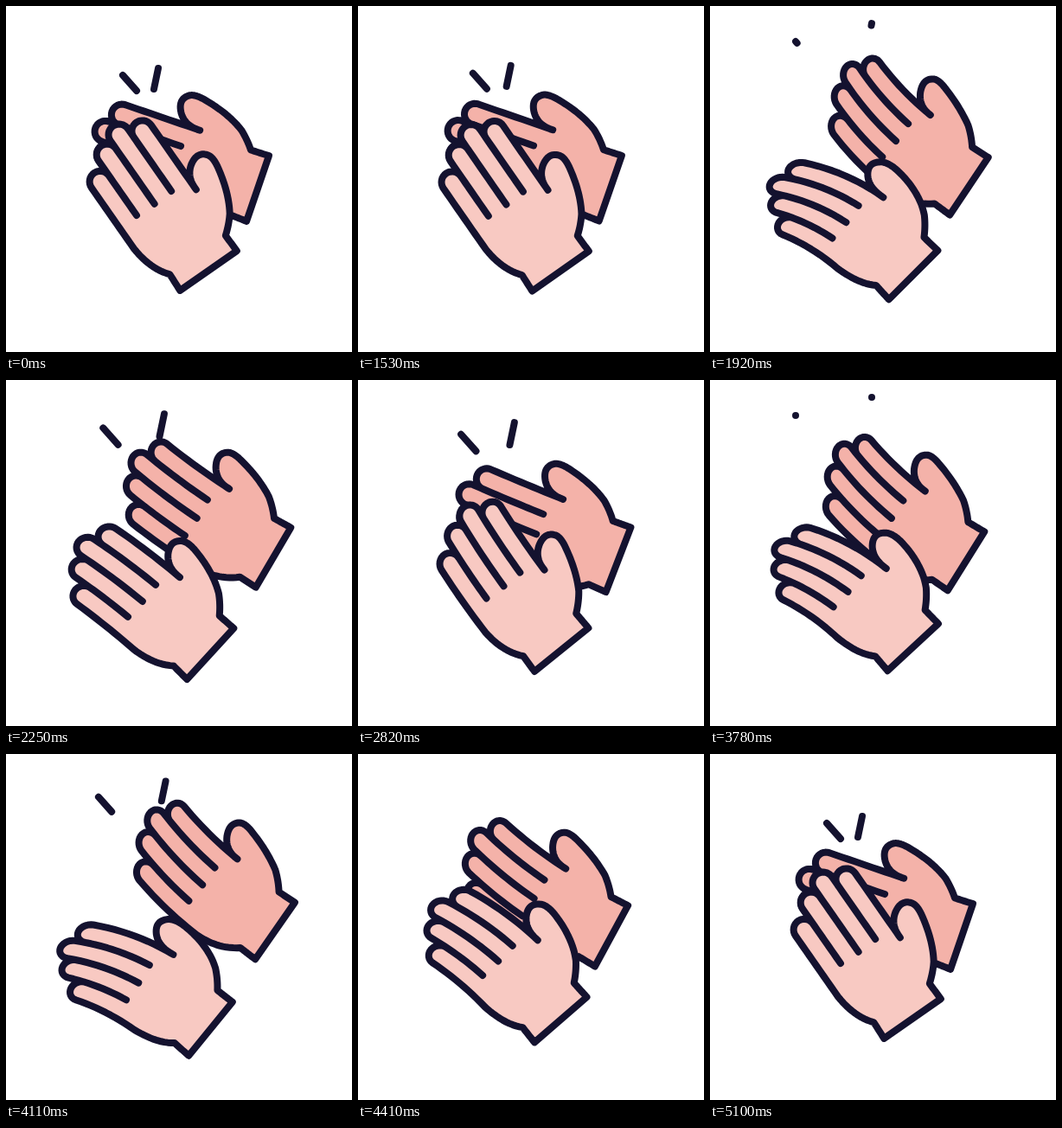
An HTML page with a canvas for the animation above (5160 ms loop, 400 px wide and 400 px high).

```html
<!DOCTYPE html>
<html lang="en">
<head>
<meta charset="utf-8">
<title>Clapping hands</title>
<style>
html, body { margin: 0; height: 100%; overflow: hidden; background: #fff; }
canvas { display: block; }
</style>
</head>
<body>
<canvas id="stage" width="400" height="400"></canvas>
<script>
const ctx = document.getElementById('stage').getContext('2d');
const LOOP = 5160, STEP = 30, FIRST = 50, LAST = 170, PERIOD = 20.2, SLOW = 97;
const INK = '#14122f';
const lerp = (a, b, k) => a + (b - a) * k;

// One clap: phase, shift, front turn, back turn, front bend, back bend, spark travel, spark length
const CLAP = [
  [0, 0, 0, 0, 0, 0, 0, 1],
  [1, .04, .3, .2, -1, 0, .06, 1],
  [3.6, .5, 4, 2.2, -10, 3, .44, 1.08],
  [4.8, .9, 12.6, 11.5, 11, 12, .63, 1.08],
  [7.5, 1, 17, 18, 56, 30, .88, .8],
  [11, .75, 14, 17, 50, 32, .98, .35],
  [15.4, .25, 8, 13.2, 38, 26, 1, 0],
  [16.2, .1, 6, 9.6, 27, 20, 1, 0],
  [18, .04, 2, 3, 8, 6, 1, 0],
  [PERIOD, 0, 0, 0, 0, 0, 1, 0]
];

// Smooth curve through the keys of one column
function sample(col, phase) {
  const end = CLAP.length - 1;
  let i = 0;
  while (i < end - 1 && CLAP[i + 1][0] <= phase) i++;
  const slope = j => j === 0 || j === end ? 0 :
    (CLAP[j + 1][col] - CLAP[j - 1][col]) / (CLAP[j + 1][0] - CLAP[j - 1][0]);
  const a = CLAP[i], b = CLAP[i + 1], span = b[0] - a[0];
  const k = (phase - a[0]) / span, k2 = k * k, k3 = k2 * k;
  return a[col] * (2 * k3 - 3 * k2 + 1) + b[col] * (3 * k2 - 2 * k3) +
    span * (slope(i) * (k3 - 2 * k2 + k) + slope(i + 1) * (k3 - k2));
}

// Hand outline: u runs from wrist to fingertips, v across towards the thumb
function buildHand() {
  const pts = [[0, -40]];
  const curve = (cu, cv, u, v) => {
    const [u0, v0] = pts[pts.length - 1];
    for (let i = 1; i <= 12; i++) {
      const k = i / 12;
      pts.push([lerp(lerp(u0, cu, k), lerp(cu, u, k), k), lerp(lerp(v0, cv, k), lerp(cv, v, k), k)]);
    }
  };
  const line = (u, v) => {
    const [u0, v0] = pts[pts.length - 1];
    curve((u0 + u) / 2, (v0 + v) / 2, u, v);
  };
  line(22, -39);
  curve(40, -54, 70, -56);
  const r = 12.25, roots = [100, 99, 100, 85];
  [156, 177, 188, 176].forEach((tip, i) => {
    const mid = -43.75 + i * 2 * r;
    line(tip, mid - r);
    for (let k = 1; k <= 16; k++) {
      const a = Math.PI * k / 16;
      pts.push([tip + r * Math.sin(a), mid - r * Math.cos(a)]);
    }
    line(roots[i], mid + r);
  });
  curve(103, 41, 112, 54);
  curve(121, 68, 110, 76);
  curve(104, 80, 90, 77);
  curve(60, 71, 40, 58);
  curve(30, 50, 22, 39.5);
  line(0, 40);
  return pts;
}
const HAND = buildHand();

function drawHand(x, y, degrees, bend, fill) {
  const angle = degrees * Math.PI / 180, c = Math.cos(angle), s = Math.sin(angle);
  ctx.beginPath();
  for (let [u, v] of HAND) {
    const f = bend * (u - 50);
    if (u > 50 && Math.abs(bend) > 1e-6) {
      u = 50 + Math.sin(f) / bend - v * Math.sin(f) / 2;
      v = (1 - Math.cos(f)) / bend + v * Math.cos(f);
    }
    ctx.lineTo(x - s * u + c * v, y - c * u - s * v);
  }
  ctx.closePath();
  ctx.fillStyle = fill;
  ctx.fill();
  ctx.stroke();
}

function drawSpark(x, y, tailX, tailY, flyX, flyY, phase) {
  const grow = (phase - 18) / (PERIOD - 18);
  if (phase > 15.9 && grow <= 0) return;
  const growing = grow > 0;
  const head = growing ? 1 - grow : 0;
  const tail = growing ? 1 : Math.max(0, sample(7, phase));
  const fly = growing ? 0 : sample(6, phase);
  const px = x + flyX * fly, py = y + flyY * fly;
  ctx.beginPath();
  ctx.moveTo(px + tailX * head, py + tailY * head);
  ctx.lineTo(px + tailX * tail + .01, py + tailY * tail);
  ctx.stroke();
}

function phaseAt(time) {
  const n = Math.floor(time % LOOP / STEP);
  if (n <= FIRST || n >= LAST) return 0;
  const run = n - FIRST;
  if (run <= SLOW) return run % PERIOD;
  // the last clap settles slowly
  return lerp(SLOW % PERIOD, PERIOD, (run - SLOW) / (LAST - FIRST - SLOW));
}

const start = performance.now();
function draw() {
  const phase = phaseAt(performance.now() - start);
  const [shift, frontTurn, backTurn, frontBend, backBend] = [1, 2, 3, 4, 5].map(c => sample(c, phase));
  ctx.clearRect(0, 0, 400, 400);
  ctx.strokeStyle = INK;
  ctx.lineWidth = 8;
  ctx.lineCap = ctx.lineJoin = 'round';
  drawHand(291 + 20 * shift, 211 - 6.5 * shift, 71.1 - backTurn, backBend / 1e4, '#f4b2a9');
  drawHand(234 + 2.5 * shift, 306 + 11.7 * shift, 34.9 + frontTurn, -frontBend / 1e4, '#f8c9c2');
  drawSpark(135, 80, 16, 18, -36, -39, phase);
  drawSpark(176, 72, -5, 24, 11, -52, phase);
  requestAnimationFrame(draw);
}
draw();
</script>
</body>
</html>
```
